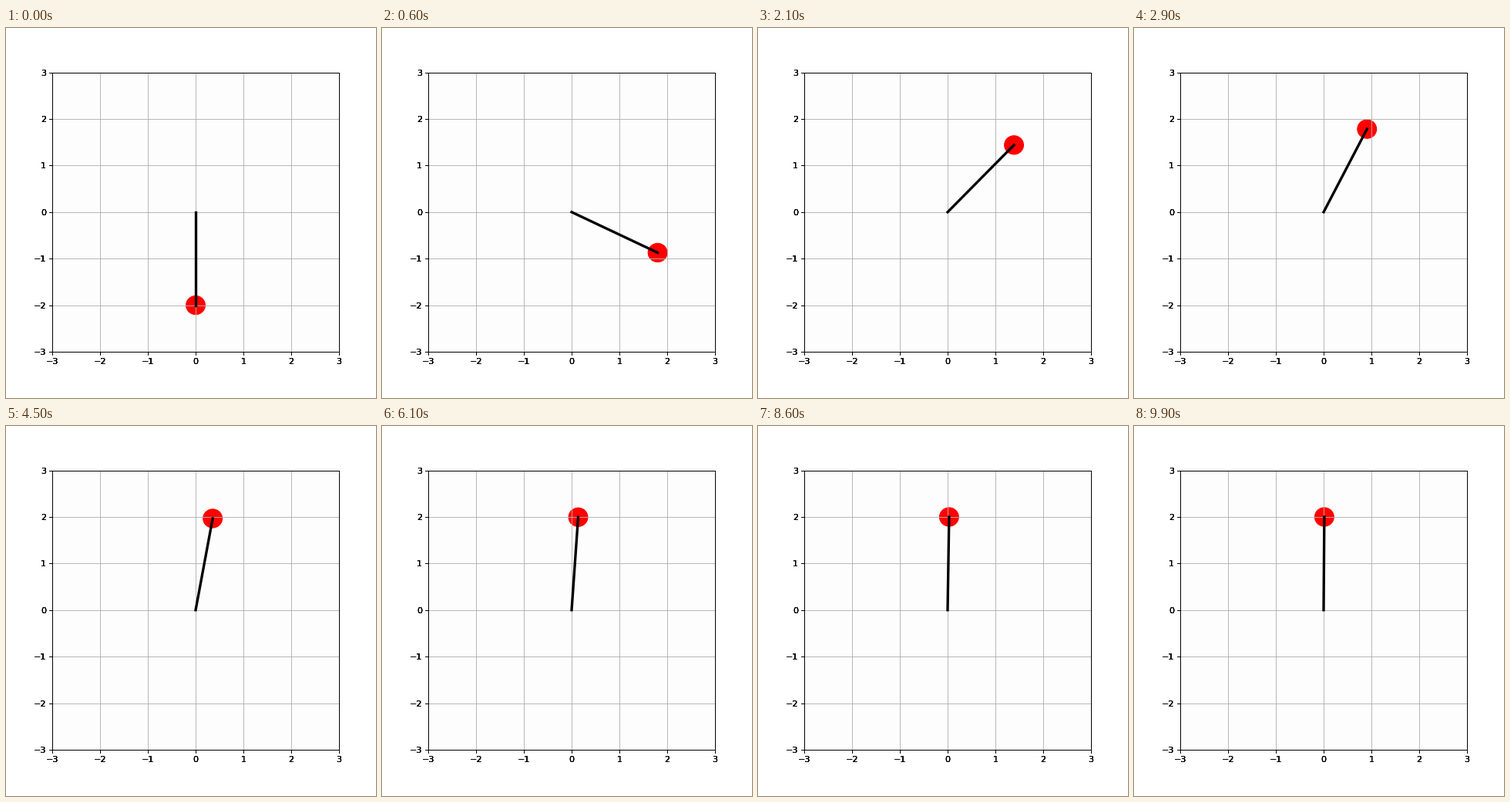
A matplotlib script for the animation above (10 s loop, 480 by 480 pixels).

```python
import numpy as np
import matplotlib.pyplot as plt
from matplotlib.animation import FuncAnimation
from matplotlib.patches import Circle

FRAMES, INTERVAL = 100, 100
LENGTH = 2.0
GAIN, GRAVITY = 0.775, 0.175  # both relative to the damping
SUBSTEPS = 20


def rate(phi):
    return -GAIN * phi + GRAVITY * np.sin(phi)


def swing_up():
    """Angle from the upright pose at every frame, starting straight down."""
    h = INTERVAL / 1000 / SUBSTEPS
    phi, angles = np.pi, []
    for _ in range(FRAMES):
        angles.append(phi)
        for _ in range(SUBSTEPS):
            phi += h * rate(phi + h / 2 * rate(phi))
    return np.array(angles)


def add_axes(label):
    ax = fig.add_axes([0.125, 0.125, 0.775, 0.755], label=label)
    ax.set(xlim=(-3, 3), ylim=(-3, 3), xticks=range(-3, 4), yticks=range(-3, 4))
    return ax


plt.rcParams.update({"font.family": "DejaVu Sans", "font.size": 10})
fig = plt.figure(figsize=(6, 6), dpi=80, facecolor="white")

ax = add_axes("main")
ax.set_facecolor("#fdfdfd")
ax.grid(True)

# Repeated frames give the labels their heavy, hard edges.
for i in range(3):
    add_axes(f"frame{i}").patch.set_visible(False)

angles = swing_up()
bob = ax.add_patch(Circle((0, -LENGTH), 0.2, color="red"))
rod, = ax.plot([], [], color="black", lw=3)


def update(i):
    x, y = LENGTH * np.sin(angles[i]), LENGTH * np.cos(angles[i])
    bob.center = x, y
    rod.set_data([0, x], [0, y])
    return bob, rod


anim = FuncAnimation(fig, update, frames=FRAMES, interval=INTERVAL,
                     repeat=True, repeat_delay=0)
plt.show()
```
